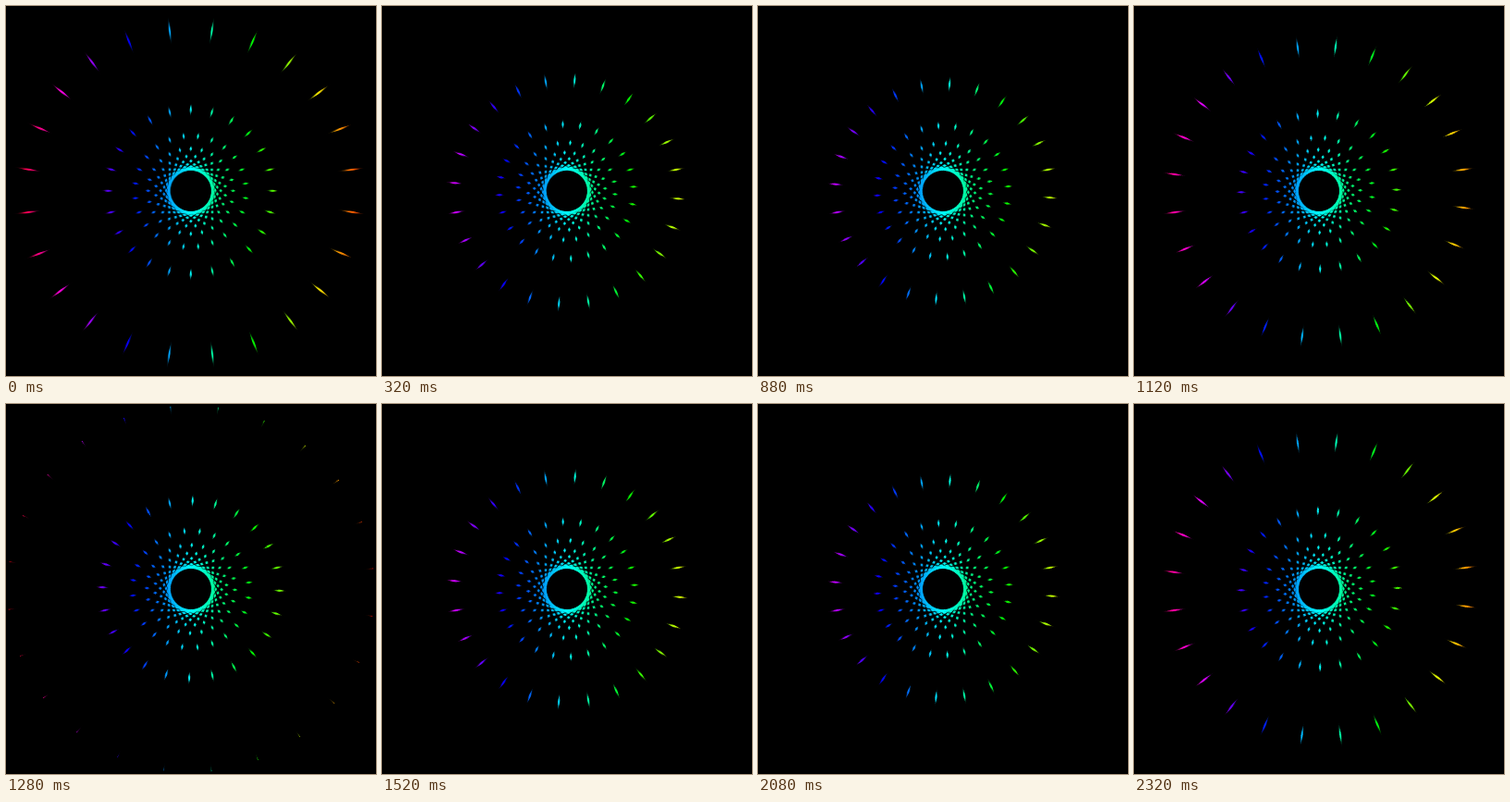
An HTML page without scripts for the animation above (2400 ms loop, 400x400 px).

```html
<!DOCTYPE html>
<html lang="en">
<head>
<meta charset="utf-8">
<title>Crossing tangents</title>
<style>
  html, body { margin: 0; width: 100%; height: 100%; overflow: hidden; background: #000; }
  svg { display: block; width: 100%; height: 100%; isolation: isolate; }
  .layer { mix-blend-mode: multiply; }
  .spin { transform-origin: 0 0; animation: spin 2400ms steps(30) infinite; }
  /* The wheel turns slightly off centre */
  @keyframes spin {
    from { transform: translate(-.5px, -.3px) rotate(0deg); }
    to { transform: translate(.1px, .25px) rotate(60.4deg); }
  }
</style>
</head>
<body>
<svg viewBox="-200 -200 400 400">
  <defs>
    <linearGradient id="rainbow">
      <stop offset="0" stop-color="#f00"/>
      <stop offset="16.667%" stop-color="#f0f"/>
      <stop offset="33.333%" stop-color="#00f"/>
      <stop offset="50%" stop-color="#0ff"/>
      <stop offset="66.667%" stop-color="#0f0"/>
      <stop offset="83.333%" stop-color="#ff0"/>
      <stop offset="100%" stop-color="#f00"/>
    </linearGradient>

    <!-- 24 rays tangent to a circle, 15 degrees apart -->
    <path id="ray" d="M-23 3V-197.5" stroke="#fff" stroke-width="2.5"/>
    <g id="pair"><use href="#ray"/><use href="#ray" transform="rotate(15)"/></g>
    <g id="four"><use href="#pair"/><use href="#pair" transform="rotate(30)"/></g>
    <g id="half">
      <use href="#four"/>
      <use href="#four" transform="rotate(60)"/>
      <use href="#four" transform="rotate(120)"/>
    </g>
    <g id="wheel">
      <circle r="300"/>
      <use href="#half"/>
      <use href="#half" transform="rotate(180)"/>
    </g>
  </defs>

  <!-- Colour shows only where rays of both wheels cross -->
  <rect x="-200" y="-200" width="400" height="400" fill="url(#rainbow)"/>
  <g class="layer"><use href="#wheel"/></g>
  <g class="layer"><g class="spin"><use href="#wheel" transform="scale(-1 1)"/></g></g>
</svg>
</body>
</html>
```
